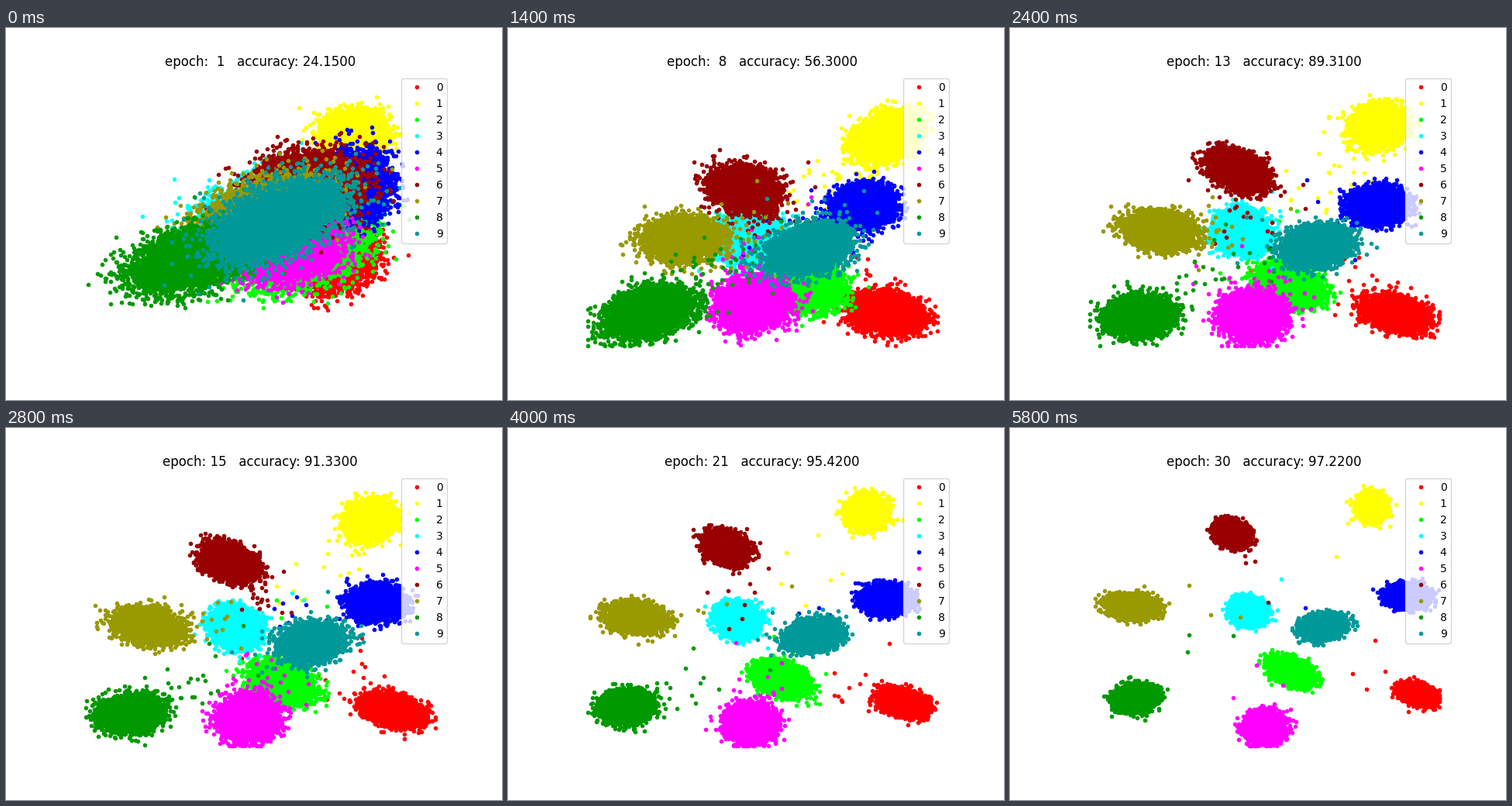
A matplotlib script for the animation above (7000 ms loop, 640x480 px).

```python
import numpy as np
import matplotlib.pyplot as plt
from matplotlib.animation import FuncAnimation

EPOCHS = 30
HOLD = 5          # extra steps on the last epoch
STEP_MS = 200
N = 5500          # points per class
COLORS = ["#ff0000", "#ffff00", "#00ff00", "#00ffff", "#0000ff",
          "#ff00ff", "#990000", "#999900", "#009900", "#009999"]
BOX_LO, BOX_HI = (102.5, 74.4), (553.5, 410.4)
MIDDLE = np.array([335, 260])

KEYS = [1, 4, 8, 13, 18, 25, 30]
ACCURACY = [24.15, 47.68, 56.30, 89.31, 94.35, 96.85, 97.22]
STRAYS = [230, 60, 110, 60, 28, 11, 6]

# cluster centres, one (x, y) pair per key epoch
CENTRES = np.array([
    [418, 295, 463, 352, 488, 367, 498, 368, 502, 358, 519, 350, 526, 343],
    [450, 135, 492, 123, 486, 140, 475, 126, 464, 107, 461, 110, 467, 102],
    [388, 283, 402, 302, 387, 333, 360, 331, 350, 325, 357, 322, 362, 314],
    [328, 245, 330, 265, 310, 270, 299, 262, 294, 250, 297, 244, 307, 236],
    [445, 203, 463, 210, 460, 230, 474, 228, 482, 221, 497, 221, 512, 216],
    [365, 285, 340, 340, 317, 355, 312, 372, 311, 378, 316, 384, 327, 386],
    [388, 203, 362, 205, 305, 208, 293, 183, 282, 158, 279, 148, 286, 136],
    [330, 237, 295, 265, 225, 271, 193, 261, 170, 247, 157, 240, 158, 230],
    [240, 298, 205, 355, 180, 367, 167, 371, 152, 364, 152, 355, 162, 348],
    [350, 248, 385, 272, 390, 285, 396, 281, 390, 270, 397, 263, 403, 256],
]).reshape(10, 7, 2)

# half width, half height and correlation of each cluster
SHAPE_KEYS = [1, 4, 13, 30]
SHAPES = np.array([
    [65, 48, -.1, 62, 40, -.1, 50, 27, .3, 30, 18, .3],
    [50, 34, .0, 62, 45, -.6, 42, 32, -.1, 25, 23, .0],
    [85, 58, -.4, 52, 42, -.3, 50, 32, .3, 34, 23, .35],
    [92, 58, -.4, 60, 45, -.2, 42, 33, .1, 29, 23, .1],
    [58, 50, -.1, 52, 40, -.4, 45, 29, .0, 34, 20, .0],
    [75, 46, -.2, 62, 42, -.2, 48, 36, .0, 32, 25, .0],
    [78, 48, -.1, 58, 40, -.1, 46, 32, .4, 28, 22, .2],
    [88, 48, -.5, 65, 38, -.3, 55, 29, .2, 40, 20, .1],
    [92, 48, -.45, 85, 50, -.65, 52, 31, -.1, 34, 22, -.1],
    [90, 58, -.5, 72, 48, -.5, 52, 31, -.15, 36, 20, -.2],
]).reshape(10, 4, 3)

rng = np.random.default_rng(7)
NOISE_A, NOISE_B = rng.standard_normal((2, 10, N, 2))


def lerp(epoch, values):
    return np.interp(epoch, KEYS, values)


def shape_at(k, epoch):
    return [np.interp(np.log(epoch), np.log(SHAPE_KEYS), SHAPES[k, :, j])
            for j in range(3)]


def spread(z, w, h, corr):
    """Correlated offsets whose dense part fills w by h."""
    reach = np.sqrt(2 * np.log(N * 2.8 ** 2 / (2 * np.pi * w * h * 0.08)))
    x = z[:, 0]
    y = corr * x + np.sqrt(1 - corr ** 2) * z[:, 1]
    return np.column_stack([x * w, y * h]) / reach


def clouds(epoch):
    local = np.random.default_rng(100 + epoch)
    turn = 0.4 * epoch
    noise = np.cos(turn) * NOISE_A + np.sin(turn) * NOISE_B
    mids = np.array([[lerp(epoch, CENTRES[k, :, j]) for j in range(2)]
                     for k in range(10)])
    n = int(lerp(epoch, STRAYS))
    for k in range(10):
        pts = mids[k] + spread(noise[k], *shape_at(k, epoch))
        # a few samples drift towards the other clusters
        goal = (MIDDLE + mids[local.integers(0, 10, n)]) / 2
        pull = 0.75 * local.random((n, 1)) ** 2
        pts[:n] += (goal - mids[k]) * pull + local.normal(0, 9, (n, 2))
        yield np.clip(pts, BOX_LO, BOX_HI)


fig, ax = plt.subplots(figsize=(6.4, 4.8), dpi=100)
ax.set_xlim(80, 576)
ax.set_ylim(427.2, 57.6)
ax.axis("off")
dots = [ax.plot([], [], ".", color=c, label=str(k))[0]
        for k, c in enumerate(COLORS)]
ax.legend(loc="upper right")
title = ax.set_title("")


def update(i):
    epoch = min(i + 1, EPOCHS)
    for line, pts in zip(dots, clouds(epoch)):
        line.set_data(pts[:, 0], pts[:, 1])
    acc = round(lerp(epoch, ACCURACY), 2)
    title.set_text(f"epoch: {epoch:2d}   accuracy: {acc:.4f}")
    return dots + [title]


anim = FuncAnimation(fig, update, frames=EPOCHS + HOLD, interval=STEP_MS,
                     repeat=True, repeat_delay=0, blit=False)
plt.show()
```
